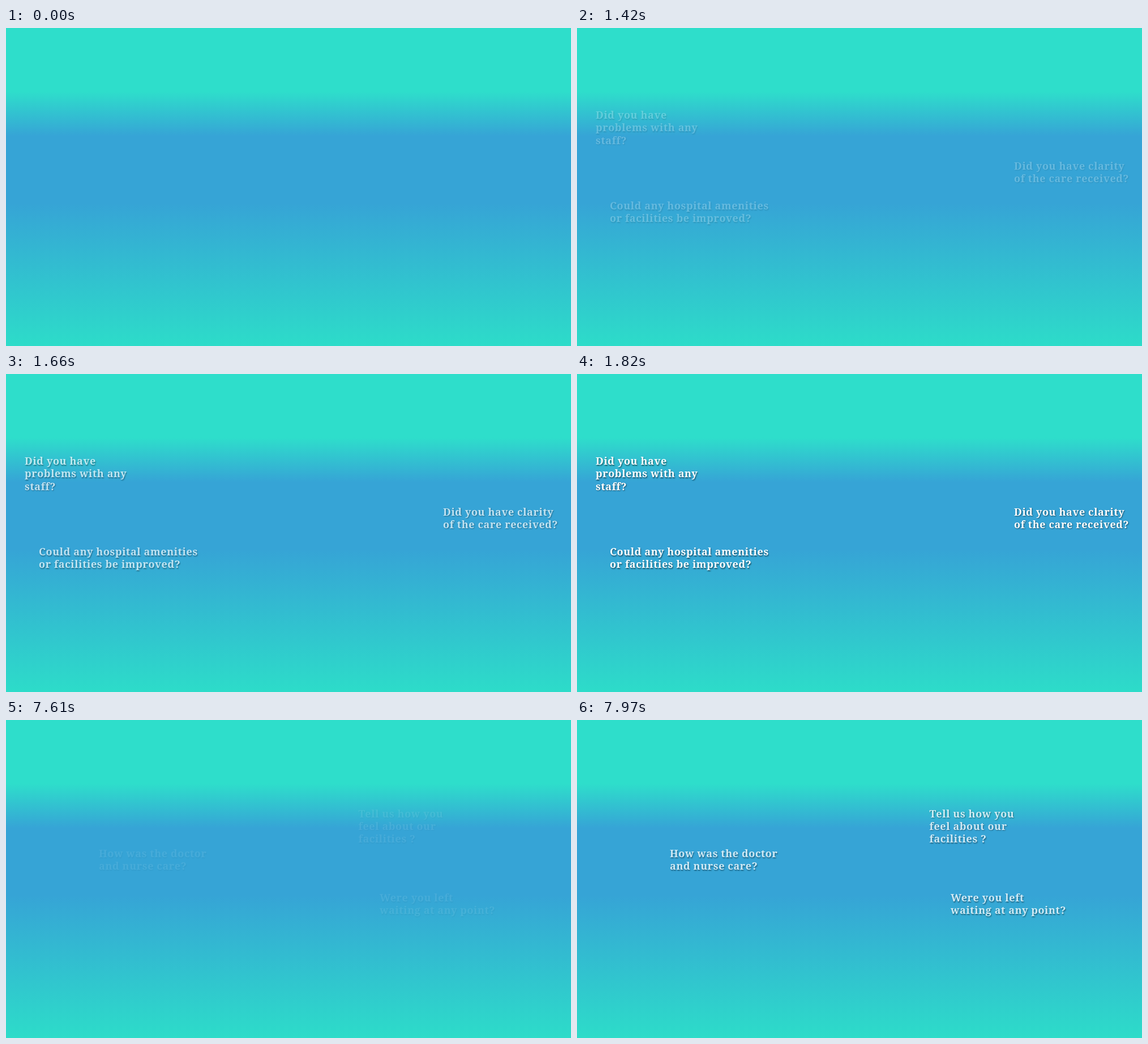
An HTML page for the animation above (8000 ms loop, 998 by 561 pixels).

```html
<!DOCTYPE html>
<html lang="en">
<head>
<meta charset="utf-8">
<title>Hospital survey questions</title>
<style>
html, body { margin: 0; width: 100%; height: 100%; overflow: hidden; background: #2edecb; }
svg { display: block; width: 100%; height: 100%; }
text {
  font: 600 18px "Noto Serif", "DejaVu Serif", serif;
  letter-spacing: .6px;
  fill: #fff;
  text-shadow: 1px 1.5px 2px rgba(0, 0, 0, .5);
}
</style>
</head>
<body>
<svg viewBox="0 0 998 561">
  <defs>
    <linearGradient id="sky" x1="0" y1="0" x2="0" y2="1">
      <stop offset=".2" stop-color="#2edecb"/>
      <stop offset=".34" stop-color="#36a4d6"/>
      <stop offset=".55" stop-color="#36a4d6"/>
      <stop offset="1" stop-color="#2ddcc9"/>
    </linearGradient>
  </defs>
  <rect width="998" height="561" fill="url(#sky)"/>
</svg>
<script>
const LOOP = 8000, STEP = 40, FADE_STEPS = 13, LEADING = 22.4;
const NS = "http://www.w3.org/2000/svg";
const svg = document.querySelector("svg");

const scenes = [
  { start: 1340, end: 6230, blocks: [
    [33, 160, "Did you have", "problems with any", "staff?"],
    [772, 249.5, "Did you have clarity", "of the care received?"],
    [58, 320, "Could any hospital amenities", "or facilities be improved?"]
  ] },
  { start: 7610, end: LOOP, blocks: [
    [622.5, 171.5, "Tell us how you", "feel about our", "facilities ?"],
    [164, 242, "How was the doctor", "and nurse care?"],
    [660, 320, "Were you left", "waiting at any point?"]
  ] }
];

function add(parent, tag, attrs = {}) {
  const el = parent.appendChild(document.createElementNS(NS, tag));
  for (const key in attrs) el.setAttribute(key, attrs[key]);
  return el;
}

for (const scene of scenes) {
  scene.group = add(svg, "g");
  for (const [x, y, ...lines] of scene.blocks) {
    lines.forEach((line, i) => {
      add(scene.group, "text", { x, y: y + i * LEADING }).textContent = line;
    });
  }
}

// Text fades in at 25 steps per second, then cuts away.
function draw(t) {
  for (const { start, end, group } of scenes) {
    const step = Math.floor((t - start) / STEP) + 1;
    const shown = t >= start && t < end;
    group.setAttribute("opacity", shown ? Math.min(1, step / FADE_STEPS) : 0);
  }
}

function tick() {
  draw(performance.now() % LOOP);
  requestAnimationFrame(tick);
}
tick();
</script>
</body>
</html>
```
